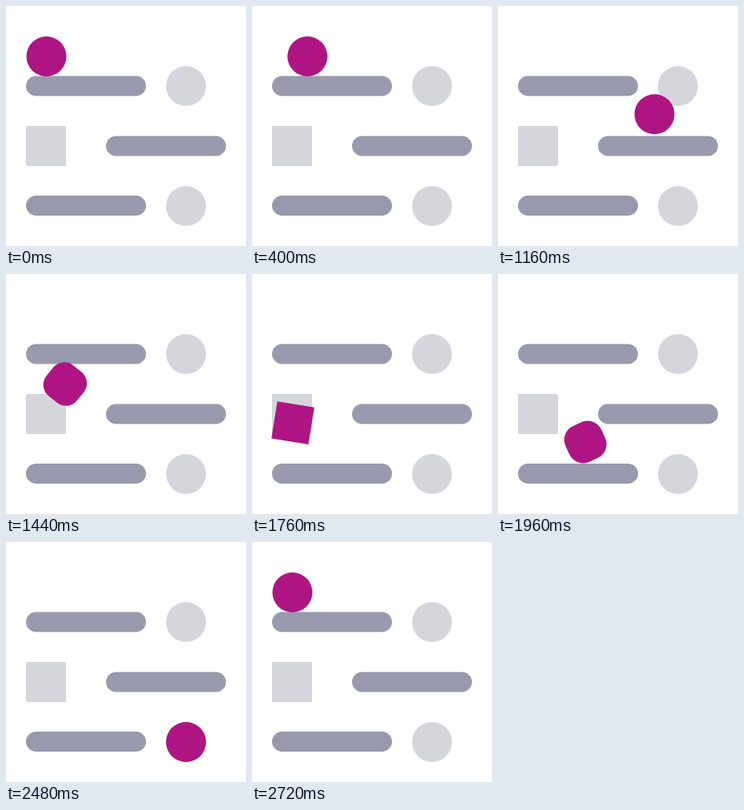
Recreate the animation shown at these times as an HTML page. Size 300 by 300 pixels, loop 3000 ms.

```html
<!DOCTYPE html>
<html lang="en">
<head>
<meta charset="utf-8">
<title>Rolling shape</title>
<style>
  html, body { margin: 0; width: 100%; height: 100%; overflow: hidden; background: #fff; }
  svg { display: block; width: 100vw; height: 100vh; }
</style>
</head>
<body>
<svg viewBox="0 0 300 300">
  <g fill="#d5d6dc">
    <circle cx="225" cy="100" r="25"/>
    <rect x="25" y="150" width="50" height="50"/>
    <circle cx="225" cy="250" r="25"/>
  </g>
  <g fill="#9899ac">
    <rect x="25" y="87.5" width="150" height="25" rx="12.5"/>
    <rect x="125" y="162.5" width="150" height="25" rx="12.5"/>
    <rect x="25" y="237" width="150" height="25" rx="12.5"/>
  </g>
  <rect id="ball" fill="#ae1582"/>
</svg>
<script>
  const LOOP = 3000, STEP = 40, START = 400, RESET = 2720;
  const ball = document.getElementById('ball');
  const clamp = v => Math.min(1, Math.max(0, v));
  const ease = v => v * v * (3 - 2 * v);

  // turn: degrees of rotation, square: 0 = circle, 1 = square
  const legs = [
    { from: 280, to: 910, d: 'M50.5 63H200Q225 63 225 97',
      turn: () => 0, square: () => 0 },
    { from: 925, to: 1660, d: 'M225 97Q225 135.5 190 135.5H90Q50 135.5 50 175',
      turn: p => 180 * (1 - p), square: p => clamp((p - 0.7) / 0.3) },
    { from: 1660, to: 2395, d: 'M50 175Q50 210 85 210H190Q225 210 225 250',
      turn: p => 180 * p, square: p => 1 - clamp((p - 0.06) / 0.4) }
  ];
  for (const leg of legs) {
    leg.path = document.createElementNS('http://www.w3.org/2000/svg', 'path');
    leg.path.setAttribute('d', leg.d);
    leg.length = leg.path.getTotalLength();
  }

  function place(x, y, turn, square) {
    const half = 25 - 1.6 * square;
    const set = (name, value) => ball.setAttribute(name, value);
    set('x', -half);
    set('y', -half);
    set('width', 2 * half);
    set('height', 2 * half);
    set('rx', Math.min(half, 25 * (1 - square)));
    set('transform', `translate(${x} ${y}) rotate(${turn})`);
  }

  function draw(time) {
    const t = Math.floor((time % LOOP) / STEP) * STEP;
    const resting = t < START || t >= RESET;
    const leg = resting ? legs[0] : legs.filter(l => t >= l.from).pop();
    const p = resting ? 0 : ease(clamp((t - leg.from) / (leg.to - leg.from)));
    const pos = leg.path.getPointAtLength(p * leg.length);
    place(pos.x, pos.y, leg.turn(p), leg.square(p));
  }

  const begin = performance.now();
  function tick() {
    draw(performance.now() - begin);
    requestAnimationFrame(tick);
  }
  tick();
</script>
</body>
</html>
```
